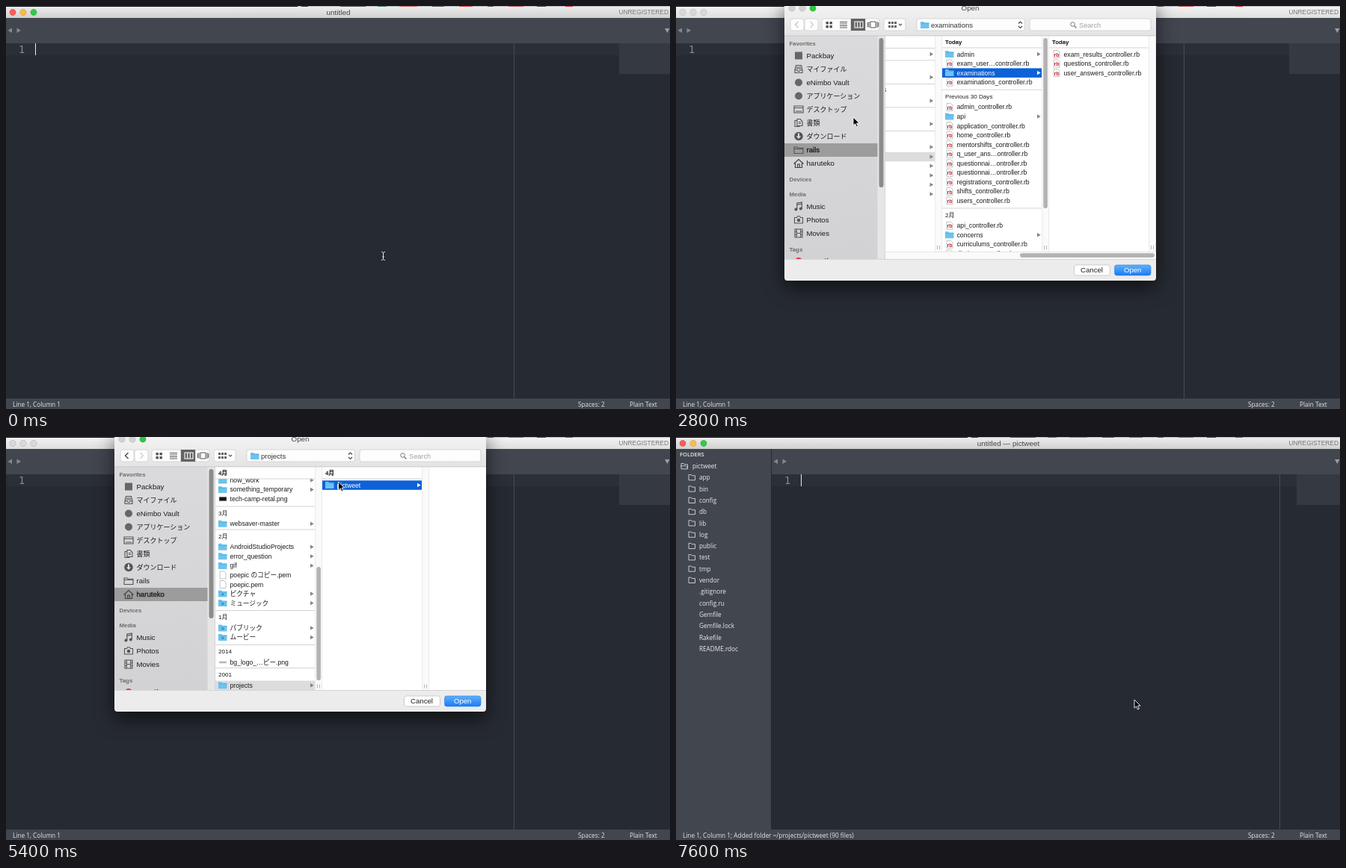
Animation of 888x540 px, one loop 7.8 s. Source, as an HTML page:

```html
<!DOCTYPE html>
<html lang="en">
<head>
<meta charset="utf-8">
<title>Opening a project folder</title>
<style>
html, body { margin: 0; width: 100%; height: 100%; overflow: hidden; background: #262a33; }
svg { display: block; width: 888px; height: 540px; }
text { white-space: pre; }
.editor { font-family: "Open Sans", "Noto Sans", sans-serif; }
.mac { font-family: "Liberation Sans", "Noto Sans CJK JP", Arial, sans-serif; }
.mono { font-family: "DejaVu Sans Mono", monospace; }
#dialog { filter: drop-shadow(0 9px 13px rgba(0, 0, 0, .62)); }
</style>
</head>
<body>
<svg id="stage" viewBox="0 0 888 540" xmlns="http://www.w3.org/2000/svg"></svg>
<script>
const LOOP = 7800, STEP = 200, SIDEBAR = 128;
const USER = 'haruteko', BOX = 'Packbay', CLOUD = 'eNimbo Vault';

// Drawing helpers; text is placed by its vertical middle.
const rect = (x, y, w, h, fill, more = '') =>
  `<rect x="${x}" y="${y}" width="${w}" height="${h}" fill="${fill}" ${more}/>`;
const text = (x, y, s, size, fill = '#1c1c1c', more = '') =>
  `<text x="${x}" y="${y + size * .35}" font-size="${size}" fill="${fill}" ${more}>${s}</text>`;
const path = (d, fill, more = '') => `<path d="${d}" fill="${fill}" ${more}/>`;
const line = (d, color, width = 1) => path(d, 'none', `stroke="${color}" stroke-width="${width}"`);
const dot = (x, y, r, fill, more = '') => `<circle cx="${x}" cy="${y}" r="${r}" fill="${fill}" ${more}/>`;
const group = (s, more = '') => `<g ${more}>${s}</g>`;
const at = (x, y, s) => group(s, `transform="translate(${x} ${y})"`);
const BOLD = 'font-weight="bold"', MID = 'text-anchor="middle"';

// ---- Editor window ----
function titleBar() {
  const lights = (colors, edge) => colors.map((c, i) =>
    dot(9 + 14 * i, 8.5, 4.2, c, `stroke="${edge}" stroke-width=".6"`)).join('');
  let s = rect(0, 0, 888, 16, 'url(#bar)') + rect(0, 0, 390, 1, '#10141b') + rect(390, 0, 498, 1, '#b9bdc2');
  [[395, 9, '#333'], [447, 34, '#555'], [497, 12, '#4a7a66'], [526, 24, '#c66'], [570, 16, '#556'],
   [606, 18, '#c44'], [644, 8, '#555'], [672, 20, '#b55'], [710, 12, '#445'], [748, 10, '#c33']]
    .forEach(([x, w, c]) => { s += rect(x, 0, w, 1, c); });
  return s +
    group(lights(['#fc5b57', '#fdbc40', '#34c84a'], '#0003'), 'id="active"') +
    group(rect(0, 1, 888, 15, '#fff', 'opacity=".3"') + lights(['#d9d9d9', '#d9d9d9', '#d9d9d9'], '#b4b4b4'), 'id="inactive"') +
    text(444.5, 8.5, 'untitled', 9.9, '#444', `id="title" ${MID}`) +
    text(886, 8.3, 'UNREGISTERED', 8.4, '#777', 'text-anchor="end"');
}

function editor() {
  return rect(0, 16, 888, 34, '#42464f') + rect(0, 50, 888, 476, '#262a32') +
    rect(0, 50, 888, 16, '#2b2f38') + rect(679, 50, 1, 476, '#474b54') +
    path('M8 29.5v6.5l-5.5-3.2zM14.5 29.5v6.5l5.5-3.2z', '#858991') +
    text(21, 58, '1', 13.5, '#868b94', `class="mono" ${MID}`) +
    rect(39, 50, 1, 16, '#e8eaed', 'id="caret"');
}

function sidebar() {
  const dirs = 'app bin config db lib log public test tmp vendor'.split(' ');
  const files = '.gitignore config.ru Gemfile Gemfile.lock Rakefile README.rdoc'.split(' ');
  const icon = (x, y) => line(`M${x} ${y - 3.5}h3.2l1 1.3h4.3v6h-8.5z`, '#d4d7db', .9);
  let s = rect(0, 16, SIDEBAR - 1, 510, '#42464f') +
    text(5, 23.8, 'FOLDERS', 7.5, '#e9ebee', 'font-weight="600"') + text(22, 39, 'pictweet', 8.2, '#e9ebee') +
    icon(7, 39) + line('M6 38.8h7.5l2.2 3.4', '#d4d7db', .8);
  [...dirs, ...files].forEach((name, i) => {
    const y = 54.5 + 15.3 * i;
    s += text(31, y, name, 8.2, '#e9ebee') + (i < dirs.length ? icon(17, y - .5) : '');
  });
  return s;
}

function statusBar() {
  const label = (x, s, more) => text(x, 533.8, s, 8.25, '#e3e5e8', more);
  return rect(0, 526, 888, 14, '#42464f') + label(9, 'Line 1, Column 1', 'id="status"') +
    label(765, 'Spaces: 2') + label(834, 'Plain Text');
}

// ---- Open dialog ----
const GLYPHS = {
  box: rect(-5, -5, 10, 10, '#666'),
  disc: dot(0, 0, 5, '#666'),
  tray: line('M-5 1l1.5-6h7l1.5 6v4h-10zM-5 1.5h3l1 1.5h2l1-1.5h3M-3-2.5h6M-3.5-.5h7', '#555', 1.1),
  desk: line('M-6-4.5h12v9h-12zM-6-2h12M-4 2.5h8', '#555', 1.2),
  docs: line('M-2-5h4l3 3v6h-7zM-2-3h-3v8h6v-1M0-1h3M0 1h3', '#555', 1.1),
  down: dot(0, 0, 5.8, '#555') + path('M-1-4h2v4h2.2l-3.2 3.5-3.2-3.5h2.2z', '#ddd'),
  folder: line('M-6-4h4l1 1.2h7v7.3h-12zM-6-1.5h12', '#555', 1.1),
  home: line('M-6.5 .5l6.5-6 6.5 6M-4.5-.5v6h9v-6M-1.3 5v-4h2.6v4', '#444', 1.2),
  note: line('M-2.2 4v-8.5l6.5-1v8.3M-2.2-2.3l6.5-1', '#555', 1.2) + dot(-3.6, 4, 2, '#555') + dot(2.8, 3, 2, '#555'),
  photo: line('M-5.5-3h3l1-1.8h3l1 1.8h3v7.5h-11z', '#555', 1.1) + dot(0, .5, 2.2, '#555'),
  film: line('M-5-5.5h10v11h-10zM-2.7-5.5v11M2.7-5.5v11M-5-2h2M-5 2h2M3-2h2M3 2h2M-2.7 0h5.4', '#555', 1.1)
};

const PLACES = [
  [66.5, 'box', BOX], [84.5, 'tray', 'マイファイル'], [102.5, 'disc', CLOUD], [120.5, 'disc', 'アプリケーション'],
  [138.5, 'desk', 'デスクトップ'], [156.5, 'docs', '書類'], [174.5, 'down', 'ダウンロード'],
  [193, 'folder', 'rails'], [211, 'home', USER],
  [268.5, 'note', 'Music'], [286.5, 'photo', 'Photos'], [304.5, 'film', 'Movies']
];

function places(selected) {
  let s = rect(145, 40, 125, 299, 'url(#side)') + rect(269.5, 40, 10.5, 299, '#e6e6e6') +
    rect(271.5, 43, 6, 200, '#8c8c8c', 'rx="3"') + rect(279.5, 40, .7, 299, '#c4c4c4');
  [[50, 'Favorites'], [232.5, 'Devices'], [252, 'Media'], [325.8, 'Tags']]
    .forEach(([y, name]) => { s += text(151.5, y, name, 7.9, '#6c6c6c', BOLD); });
  for (const [y, glyph, name] of PLACES) {
    const on = name === selected;
    if (on) s += rect(145, y - 9, 124.5, 18, '#9c9c9c');
    s += at(164, y, GLYPHS[glyph]) +
      text(174.5, y, name, /[^\x00-\x7f]/.test(name) ? 9 : 9.65, '#1b1b1b', on ? 'stroke="#1b1b1b" stroke-width=".3"' : '');
  }
  return s + dot(164, 342, 5, '#f0303c') + text(174.5, 342, 'to verify', 9.65, '#1b1b1b');
}

const blueFolder = (x, y) => path(`M${x} ${y - 4.5}h4.2l1.2 1.3h6.1v7.7h-11.5z`, '#6cc3ee') +
  rect(x, y - 2.2, 11.5, .6, '#4fa9da');
const page = (x, y) => path(`M${x + 2} ${y - 5}h5.5l2.5 2.5v7.5h-8z`, '#fff', 'stroke="#aaa" stroke-width=".7"');
const ICONS = {
  d: blueFolder,
  s: (x, y) => blueFolder(x, y) + dot(x + 5.8, y + .8, 1.7, '#3295cc'),
  r: (x, y) => page(x, y) + text(x + 6, y + .7, 'rb', 7, '#c3202f', `${BOLD} ${MID}`),
  f: page,
  z: (x, y) => page(x, y) + rect(x + 5.3, y - 3.5, 1.3, 5, '#333'),
  p: (x, y) => rect(x + 1, y - 2.8, 10, 5.6, '#161616', 'stroke="#bbb" stroke-width=".6"'),
  l: (x, y) => rect(x + 1, y - 1.2, 10, 2.6, '#bbb', 'rx="1"')
};
ICONS.b = ICONS.s;

// An entry is an icon letter followed by the name.
function row(x, y, w, entry, mark) {
  const kind = entry[0], on = mark === 'blue';
  let s = mark ? rect(x, y - 6.2, w, 12.5, on ? '#0d62d8' : '#dcdcdc') : '';
  s += ICONS[kind](x + 4, y) + text(x + 19.5, y, entry.slice(1), 8.66, on ? '#fff' : '#1c1c1c');
  if (kind === 'b') s += dot(x + 117, y, 4.5, '#2077e0');
  if ('dsb'.includes(kind)) s += tick(x + w - 6, y, on ? '#fff' : '#858585');
  return s;
}
const tick = (x, y, fill = '#858585') => path(`M${x} ${y - 2.7}v5.4l4.7-2.7z`, fill);

function column(x, head, groups, marks = {}, y = 64.5, w = 133) {
  let s = '', size = 0;
  groups.forEach(([name, entries], i) => {
    if (i) {
      const gap = size === 1 ? 16.6 : 18.9;
      y += gap - 12.55;
      s += rect(x, y - 9.3, w, .8, '#c9c9c9') + text(x + 4, y, name, 8.1);
      y += 14.4;
    }
    for (const e of entries) {
      s += row(x, y, w, e, marks[e.slice(1)]);
      y += 12.55;
    }
    size = entries.length;
  });
  return s + rect(x, 40, w, 16, '#fff') + rect(x, 55.6, w, .8, '#c9c9c9') + text(x + 4, 48.3, head, 7.8, '#111', BOLD);
}

function track(x, gripY, thumbY, thumbH, h = 299) {
  return rect(x, 40, 9, h, '#fafafa') + line(`M${x + .2} 40v${h}M${x + 9} 40v${h}`, '#e2e2e2', .7) +
    (thumbH ? rect(x + 1.8, thumbY, 5.6, thumbH, '#b3b3b3', 'rx="2.8"') : '') +
    line(`M${x + 3} ${gripY - 2.5}v5M${x + 6} ${gripY - 2.5}v5`, '#999', .7);
}

const RESULT_FILES = ['rexam_results_controller.rb', 'rquestions_controller.rb', 'ruser_answers_controller.rb'];

function iconView() {
  const labels = [['exam_results_contr', 'oller.rb'], ['questions_controlle', 'r.rb'], ['user_answers_contr', 'oller.rb']];
  return text(284, 48.3, 'Today', 7.8, '#111', BOLD) + rect(280, 55.6, 362, .8, '#c9c9c9') +
    labels.map(([a, b], i) => {
      const x = 328 + 100 * i;
      return path(`M${x - 17} 64h24l10 10v38h-34z`, '#fcfcfc', 'stroke="#c8c8c8"') + line(`M${x + 7} 64v10h10`, '#c8c8c8') +
        text(x, 106, 'RUBY', 8, '#777', MID) + text(x, 121, a, 8.66, '#1c1c1c', MID) + text(x, 132, b, 8.66, '#1c1c1c', MID);
    }).join('');
}

function examView() {
  let s = rect(280, 195.8, 66.5, 12.5, '#dcdcdc');
  [64.5, 95.5, 127, 158, 189, 202, 214.3, 227, 239.5, 252].forEach(y => { s += tick(339.5, y); });
  [56, 72.5, 104, 135.5, 167].forEach(y => { s += rect(280, y, 66.5, .8, '#c9c9c9'); });
  s += text(277, 112, 's', 8.66) + track(346.5, 323.5, 0, 0, 289);
  s += column(356, 'Today', [
    ['', ['dadmin', 'rexam_user…controller.rb', 'dexaminations', 'rexaminations_controller.rb']],
    ['Previous 30 Days', ['radmin_controller.rb', 'dapi', 'rapplication_controller.rb', 'rhome_controller.rb',
      'rmentorshifts_controller.rb', 'rq_user_ans…ontroller.rb', 'rquestionnai…ontroller.rb', 'rquestionnai…ontroller.rb',
      'rregistrations_controller.rb', 'rshifts_controller.rb', 'rusers_controller.rb']],
    ['2月', ['rapi_controller.rb', 'dconcerns', 'rcurriculums_controller.rb', 'rdiaries_controller.rb']]
  ], { examinations: 'blue' });
  s += track(489.5, 323.5, 43, 228, 289) + column(499, 'Today', [['', RESULT_FILES]]) + track(632.5, 323.5, 0, 0, 289);
  return s + rect(280, 329, 362, 10, '#fafafa') + rect(280, 329, 362, .7, '#dedede') +
    rect(460, 331.3, 180, 5.6, '#b3b3b3', 'rx="2.8"');
}

function homeView() {
  return column(280, 'Today', [
    ['', ['dprojects', 'drails', 'sダウンロード', 'sデスクトップ']],
    ['Yesterday', ['dpractice', 's書類']],
    ['Previous 7 Days', ['zcurl のコピー.zip', 'b' + BOX, 'sアプリケーション']],
    ['Previous 30 Days', ['dautojump', 'dcurl のコピー', 'frikkann.pem']],
    ['4月', ['dblog', 'pdaikonsu.png', 'dnow_work', 'dsomething_temporary']]
  ]) + track(413.5, 334, 43, 158) + track(556.5, 334, 0, 0);
}

function projectsView(picked) {
  return column(280, '4月', [
    ['', ['dnow_work', 'dsomething_temporary', 'ptech-camp-retal.png']],
    ['3月', ['dwebsaver-master']],
    ['2月', ['dAndroidStudioProjects', 'derror_question', 'dgif', 'fpoepic のコピー.pem', 'fpoepic.pem', 'sピクチャ', 'sミュージック']],
    ['1月', ['sパブリック', 'sムービー']],
    ['2014', ['lbg_logo_…ピー.png']],
    ['2001', ['dprojects']]
  ], { projects: 'gray' }, 57.9) + track(413.5, 334, 174, 152) +
    column(423, '4月', [['', ['dpictweet']]], picked ? { pictweet: 'blue' } : {}) + track(556.5, 334, 0, 0);
}

function toolbar(where, cell, canGoBack) {
  const button = (x, w, fill = '#fdfdfd') => rect(x, 17, w, 16, fill, 'rx="3" stroke="#cfcfcf" stroke-width=".8"');
  const ink = i => i === cell ? '#fff' : '#555';
  let s = rect(145, -6, 497, 46, 'url(#tool)') + rect(145, 39.5, 497, .8, '#c2c2c2');
  ['#d2d2d2', '#d2d2d2', '#2fc642'].forEach((c, i) => { s += dot(155 + 14 * i, 3, 4.3, c, 'stroke="#0003" stroke-width=".5"'); });
  s += text(393.5, 3, 'Open', 9.8, '#444', MID) + button(153, 18) + button(172, 18) +
    line('M163.5 21l-4 4 4 4', canGoBack ? '#444' : '#c4c4c4', 1.3) + line('M179.5 21l4 4-4 4', '#cfcfcf', 1.3);
  s += button(195, 77) + rect(195 + 19.4 * cell, 17, 19.4, 16, '#636363');
  for (const [dx, dy] of [[0, 0], [5, 0], [0, 5], [5, 5]]) s += rect(200.5 + dx, 21 + dy, 3.4, 3.4, ink(0));
  s += line('M219 21.5h10M219 24h10M219 26.5h10M219 29h10', ink(1)) +
    line('M239 21h11v8h-11zM242.7 21v8M246.3 21v8', ink(2), 1.1) +
    line('M260 21h7v8h-7zM258 21v8M256.3 22v6M269 21v8M270.7 22v6', ink(3));
  s += button(278, 29) + line('M298 24l2 2 2-2', '#555', 1.1);
  for (let i = 0; i < 6; i++) s += rect(284 + i % 3 * 4, 21 + (i > 2) * 5, 3, 3, '#666');
  s += button(322, 144.5) + (where === USER ? at(333, 25.5, group(GLYPHS.home, 'transform="scale(.8)"')) : blueFolder(327, 25.5)) +
    text(341, 25.5, where, 9.5, '#333') + line('M458 23.5l2.5-2.5 2.5 2.5M458 27l2.5 2.5 2.5-2.5', '#444', 1.1);
  return s + button(473, 162) + dot(530.5, 24.5, 2.8, 'none', 'stroke="#777"') + line('M532.5 26.5l3 3', '#777', 1.2) +
    text(539, 25.5, 'Search', 9.2, '#a0a0a0');
}

function dialog([content, place, where, cell, canGoBack]) {
  return group(
    rect(145, -6, 497, 374, '#ececec') +
    group(places(place), 'clip-path="url(#sideClip)"') +
    group(rect(280, 40, 362, 299, '#fff') + content, 'clip-path="url(#listClip)"') +
    toolbar(where, cell, canGoBack) + rect(145, 339, 497, .8, '#d0d0d0') +
    rect(532.5, 347, 48, 14, '#fff', 'rx="3" stroke="#c2c2c2" stroke-width=".8"') + text(556, 354, 'Cancel', 9.65, '#222', MID) +
    rect(586.5, 347, 48.5, 14, 'url(#blue)', 'rx="3" stroke="#2b7fe0" stroke-width=".6"') + text(610.7, 354, 'Open', 9.6, '#fff', MID),
    'class="view" clip-path="url(#frame)"');
}

const VIEWS = [
  [iconView(), '', 'examinations', 0, false],
  [examView(), 'rails', 'examinations', 2, false],
  [homeView(), USER, USER, 2, true],
  [projectsView(false), USER, 'projects', 2, true],
  [projectsView(true), USER, 'projects', 2, true]
];

const shade = (id, a, b) => `<linearGradient id="${id}" x2="0" y2="1"><stop stop-color="${a}"/><stop offset="1" stop-color="${b}"/></linearGradient>`;
const clip = (id, x, y, w, h, r = 0) => `<clipPath id="${id}">${rect(x, y, w, h, '#000', `rx="${r}"`)}</clipPath>`;

document.getElementById('stage').innerHTML =
  `<defs>${shade('bar', '#eeeeee', '#d0d0d0')}${shade('tool', '#f4f4f4', '#e4e4e4')}${shade('side', '#dadadc', '#d2d2d4')}
  ${shade('blue', '#60b0fb', '#1a7cf5')}${clip('sideClip', 145, 40, 135, 299)}${clip('listClip', 280, 40, 362, 299)}
  ${clip('frame', 145, -6, 497, 374, 4)}</defs>` +
  group(group(editor(), 'id="editor"') + group(rect(0, 50, 68, 41, '#353942'), 'id="minimap"') +
    path('M881 30h6.5l-3.2 6z', '#9a9da4') + group(sidebar(), 'id="sidebar"') + statusBar(), 'class="editor"') +
  group(titleBar() + group(VIEWS.map(dialog).join(''), 'id="dialog"'), 'class="mac"') +
  path('M0 0v11.2l2.6-2.4 1.9 4.2 1.9-.8-1.9-4.1h3.6z', '#000', 'id="arrow" stroke="#fff" stroke-width=".9"') +
  group(line('M-2.5-5.5q2 0 2.5 1.2q.5-1.2 2.5-1.2M-2.5 5.5q2 0 2.5-1.2q.5 1.2 2.5 1.2M0-4.5v9M-1.3 1h2.6', '#e8e8e8'), 'id="beam"');

// ---- Motion ----
const PATH = [[1600, 504, 331], [1800, 470, 280], [2000, 380, 150], [2200, 262, 45], [2400, 244, 24], [2600, 243, 60],
  [2800, 237, 149], [3000, 205, 203], [3400, 195, 210], [3600, 200, 205], [4000, 280, 110], [4200, 318, 70],
  [4400, 323.5, 60], [4800, 320, 61], [5200, 432, 61], [5400, 444.5, 60], [5600, 500, 150], [5800, 590, 315], [6000, 613, 352]];

function pointer(t) {
  const i = PATH.findIndex(p => p[0] >= t);
  if (i < 0) return PATH[PATH.length - 1].slice(1);
  if (!i) return PATH[0].slice(1);
  const [t0, x0, y0] = PATH[i - 1], [t1, x1, y1] = PATH[i], k = (t - t0) / (t1 - t0);
  return [x0 + (x1 - x0) * k, y0 + (y1 - y0) * k];
}

const el = id => document.getElementById(id);
const show = (node, on) => { node.style.display = on ? '' : 'none'; };
const move = (id, x, y) => el(id).setAttribute('transform', `translate(${x} ${y})`);
const views = [...document.querySelectorAll('.view')];

function draw(t) {
  const open = t >= 1400 && t < 6200, added = t >= 7200;
  const slide = t < 7200 ? 0 : t < 7400 ? .6 : 1;
  const view = [2400, 3200, 4800, 5400].filter(start => t >= start).length;
  const blink = { 600: .5, 800: 0, 6400: .5, 6600: 0 };

  show(el('active'), !open);
  show(el('inactive'), open);
  show(el('dialog'), open);
  views.forEach((v, i) => show(v, i === view));
  const scale = t < 1600 ? .39 : 1;
  el('dialog').setAttribute('transform', `translate(393.5 181) scale(${scale}) translate(-393.5 -181)`);
  el('dialog').setAttribute('opacity', t < 1600 ? .62 : 1);

  el('caret').setAttribute('opacity', open ? 0 : blink[t] ?? 1);
  move('editor', SIDEBAR * slide, 0);
  move('sidebar', SIDEBAR * (slide - 1), 0);
  move('minimap', 820 + 10 * slide, 0);
  el('title').textContent = added ? 'untitled — pictweet' : 'untitled';
  el('status').textContent = 'Line 1, Column 1' + (added ? '; Added folder ~/projects/pictweet (90 files)' : '');

  const arrow = open || added;
  show(el('arrow'), arrow);
  show(el('beam'), !arrow);
  move('arrow', ...pointer(t));
  move('beam', ...(t < 1400 ? [504.5, 335] : [613.5, 355]));
}

const start = performance.now();
let last = -1;
function tickFrame() {
  const t = Math.floor((performance.now() - start) % LOOP / STEP) * STEP;
  if (t !== last) draw(last = t);
  requestAnimationFrame(tickFrame);
}
tickFrame();
</script>
</body>
</html>
```
